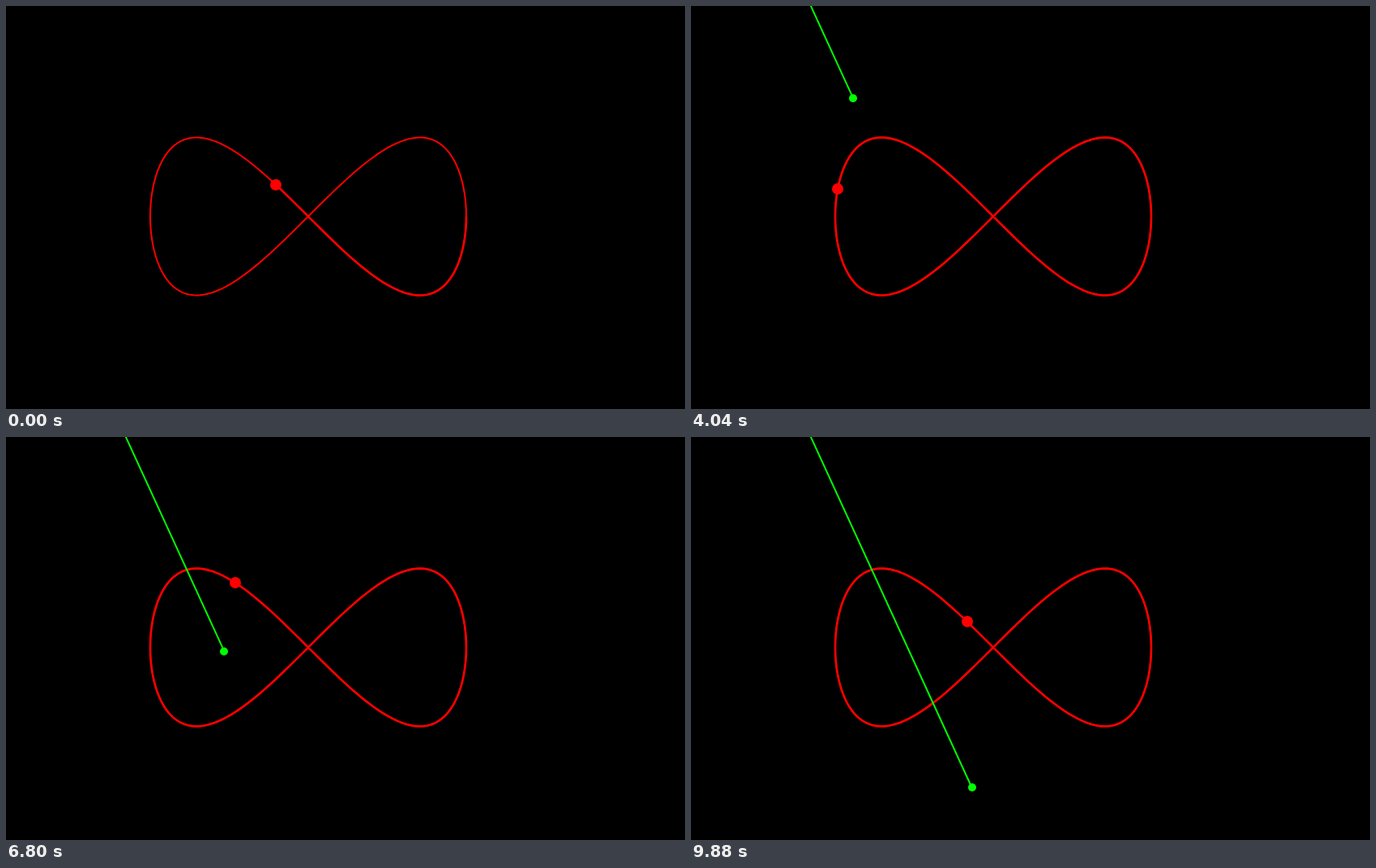
An HTML page with a canvas that plays this animation: 838x498 px, repeating every 9920 ms.

```html
<!DOCTYPE html>
<html lang="en">
<head>
<meta charset="utf-8">
<title>Figure eight and a straight path</title>
<style>
  html, body { margin: 0; height: 100%; overflow: hidden; background: #000; }
  canvas { display: block; }
</style>
</head>
<body>
<canvas width="838" height="498"></canvas>
<script>
const ctx = document.querySelector('canvas').getContext('2d');
const LOOP = 9920, HOLD = 250, LAST = 238;
const TURN = 2 * Math.PI, STEP = 0.03, START = 1.7774;
const RED = '#f00', GREEN = '#0f0';

const eight = a => [373 + 195 * Math.cos(a), 260 + 97.5 * Math.sin(2 * a)];
const straight = tick => [103.5 + 0.3876 * tick, -96.8 + 0.845 * tick];

// The picture updates about every 40 ms, after an initial hold.
function ticksAt(time) {
  if (time < HOLD) return 0;
  const update = Math.min(LAST, Math.floor((time - 240) / 40.63) + 1);
  // The motion slows slightly near the end.
  return Math.round(Math.min(2.64 * update + 0.8, 594.8 + 2.5 * (update - 225)));
}

function trail(points, color, width) {
  ctx.beginPath();
  for (const point of points) ctx.lineTo(...point);
  ctx.strokeStyle = color;
  ctx.lineWidth = width;
  ctx.stroke();
}

function dot([x, y], radius, color) {
  ctx.beginPath();
  ctx.arc(Math.round(x), Math.round(y), radius, 0, TURN);
  ctx.fillStyle = color;
  ctx.fill();
}

function arc(end) {
  const points = [];
  for (let a = 0; a < end; a += STEP) points.push(eight(a));
  return [...points, eight(end)];
}

function draw(time) {
  const tick = ticksAt(time);
  const angle = START + STEP * tick;
  ctx.fillStyle = '#000';
  ctx.fillRect(0, 0, 838, 498);
  trail(arc(TURN), RED, 2);
  trail(arc(Math.min(angle, TURN)), RED, 2.6);
  dot(eight(angle), 7, RED);
  trail([straight(0), straight(tick)], GREEN, 2);
  dot(straight(tick), 5, GREEN);
}

const begin = performance.now();
function play() {
  draw((performance.now() - begin) % LOOP);
  requestAnimationFrame(play);
}
play();
</script>
</body>
</html>
```
